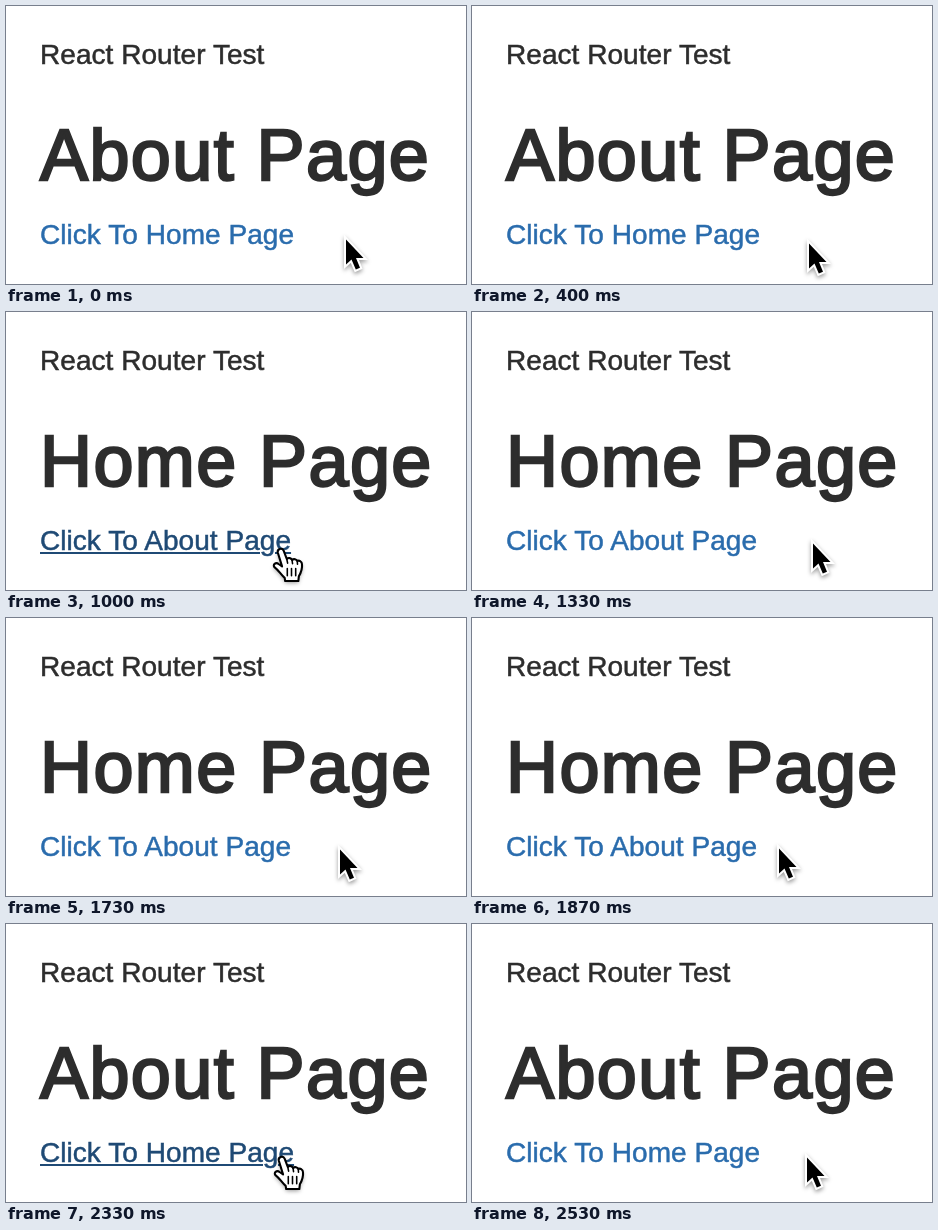
Write an HTML page with a canvas that moves like this. It is 460 by 278 pixels and loops after 2.56 s.

```html
<!DOCTYPE html>
<html lang="en">
<head>
<meta charset="utf-8">
<title>React Router Test</title>
<style>
  html, body { margin: 0; width: 100%; height: 100%; overflow: hidden; background: #fff; }
  body { position: relative; font-family: "Liberation Sans", Arial, sans-serif; color: #2d2d2d; }
  p, h1, a, canvas { position: absolute; margin: 0; white-space: nowrap; }
  p, a, h1 { left: 34px; }
  p, a {
    font-size: 28px; line-height: 40px; letter-spacing: .05px;
    -webkit-text-stroke: .5px currentColor;
  }
  p { top: 29px; }
  a { top: 209px; color: #2a6cad; text-decoration: none; }
  a.hover {
    color: #1f4a75;
    text-decoration: underline;
    text-decoration-thickness: 2px;
    text-underline-offset: 2px;
  }
  h1 {
    top: 99px;
    font-size: 72px; line-height: 100px; font-weight: 400; letter-spacing: 1.4px;
    -webkit-text-stroke: 2.4px currentColor;
  }
  canvas { left: 0; top: 0; }
</style>
</head>
<body>
<p>React Router Test</p>
<h1 id="title">About Page</h1>
<a id="link">Click To Home Page</a>
<canvas id="stage" width="460" height="278"></canvas>
<script>
const LOOP = 2560, TICK = 1000 / 30, TICKS = 77;
const LINK_EDGE = 288;
const TO_HOME = 28, TO_ABOUT = 70;

// Pointer glides in ticks; the last one runs past the end of the loop.
const rest = { x: 348, y: 235 };
const onHome = { x: 277, y: 238 };
const away = { x: 340, y: 229 };
const onAbout = { x: 278, y: 234 };
const glides = [
  { start: 11, end: 26, from: rest, to: onHome, power: 2.7, arc: 0 },
  { start: 32, end: 40, from: onHome, to: away, power: 2, arc: 0 },
  { start: 51, end: 62, from: away, to: onAbout, power: 1.34, arc: 3 },
  { start: 70, end: 81, from: onAbout, to: rest, power: 2, arc: 4 }
];

const title = document.getElementById("title");
const link = document.getElementById("link");
const ctx = document.getElementById("stage").getContext("2d");

const arrow = new Path2D("M0 0V25L5.5 20L9.8 30L14 28.2L10 18.5H17.5Z");
const hand = new Path2D(
  "M-3 4C-4 0 1 -1 2.5 2L5.5 10C7 8.5 10 9 10.5 11C12 9.5 15 10 15.5 12" +
  "C17 11 20 12 20 15C20.5 20 19 23 17 26.5L16.5 31H4L3.5 28" +
  "C0 25 -2 21 -6 18C-8.5 15.5 -5 12.5 -2 15L1 17Z"
);

function pointerAt(tick) {
  const t = tick < glides[0].start ? tick + TICKS : tick;
  const { start, end, from, to, power, arc } = glides.findLast(g => t >= g.start);
  const u = Math.min(1, (t - start) / (end - start));
  const k = 1 - (1 - u) ** power;
  return {
    x: Math.round(from.x + (to.x - from.x) * k),
    y: Math.round(from.y + (to.y - from.y) * u - arc * Math.sin(Math.PI * u))
  };
}

const overLink = tick => pointerAt(tick).x <= LINK_EDGE;

function shadow(on) {
  ctx.shadowColor = on ? "rgba(0,0,0,.4)" : "transparent";
  ctx.shadowBlur = 4;
  ctx.shadowOffsetY = 2;
}

function drawArrow() {
  ctx.translate(1, 2.5);
  ctx.strokeStyle = "#fff";
  ctx.lineWidth = 4;
  shadow(true);
  ctx.stroke(arrow);
  shadow(false);
  ctx.fillStyle = "#000";
  ctx.fill(arrow);
}

function drawHand() {
  ctx.translate(-2, -1.5);
  ctx.scale(1.05, 1.05);
  ctx.lineJoin = ctx.lineCap = "round";
  ctx.fillStyle = "#fff";
  ctx.strokeStyle = "#000";
  shadow(true);
  ctx.fill(hand);
  shadow(false);
  ctx.lineWidth = 2;
  ctx.stroke(hand);
  ctx.lineWidth = 1.5;
  ctx.beginPath();
  for (let i = 0; i < 3; i++) {
    ctx.moveTo(6 + 4 * i, 19);
    ctx.lineTo(6 + 4 * i, 26);
    ctx.moveTo(5.5 + 5 * i, 10 + i);
    ctx.lineTo(6.3 + 4.7 * i, 14 + i / 2);
  }
  ctx.stroke();
}

function render(ms) {
  const tick = Math.min(TICKS - 1, Math.floor((ms % LOOP + 3.4) / TICK));
  const { x, y } = pointerAt(tick);
  const home = tick >= TO_HOME && tick < TO_ABOUT;
  title.textContent = home ? "Home Page" : "About Page";
  link.textContent = home ? "Click To About Page" : "Click To Home Page";
  // The link style follows the pointer one tick late.
  link.className = overLink(tick - 1) ? "hover" : "";

  ctx.clearRect(0, 0, 460, 278);
  ctx.save();
  ctx.translate(x, y);
  if (overLink(tick)) drawHand();
  else drawArrow();
  ctx.restore();
}

const start = performance.now();
function loop() {
  render(performance.now() - start);
  requestAnimationFrame(loop);
}
loop();
</script>
</body>
</html>
```
